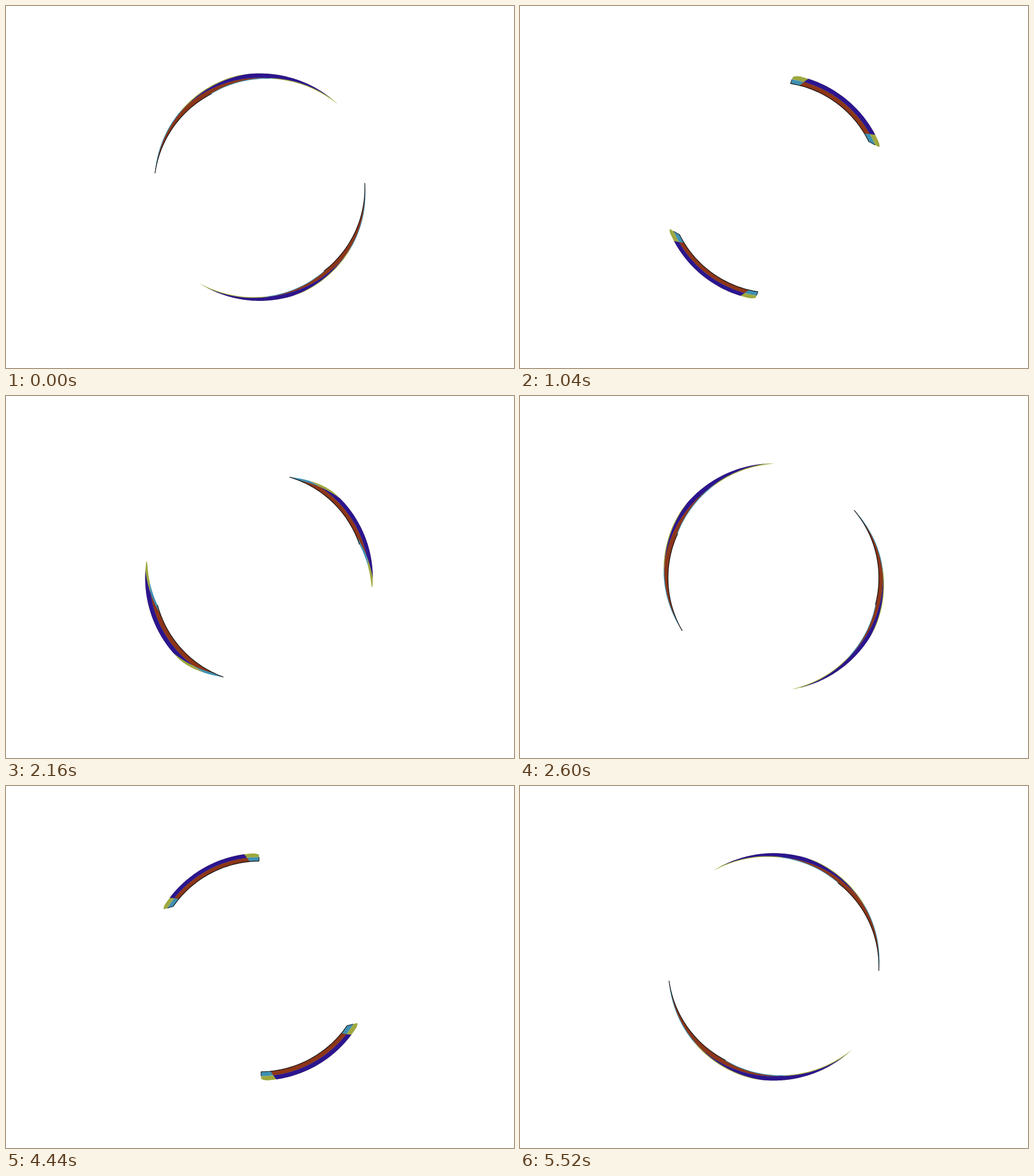
Write an HTML page with a canvas that moves like this. It is 886x632 px and loops after 5.56 s.

```html
<!DOCTYPE html>
<html lang="en">
<head>
<meta charset="utf-8">
<title>Twisting bands</title>
<style>
  html, body { margin: 0; width: 100%; height: 100%; overflow: hidden; background: #fff; }
  canvas { display: block; }
</style>
</head>
<body>
<canvas id="stage" width="886" height="632"></canvas>
<script>
const ctx = document.getElementById('stage').getContext('2d');
const STEP = 40, COUNT = 139, LAST = COUNT - 1, TURN = 33;
const CX = 442.5, CY = 317.5, RAD = Math.PI / 180;
const CORE = 22.4;           // half width of the band without its caps, degrees
const REST = 85;             // band angle at the turning point, degrees
const TWIST = 0.0965;        // inner edge lag per degree of turn

// steps from the turning point, degrees turned, degrees per step
const KEYS = [[0, 0, 0], [7, 35, 10], [22, 274, 29], [33, 731, 41], [37, 895, 41]];

function turned(x) {
  let i = 0;
  while (i < KEYS.length - 2 && x > KEYS[i + 1][0]) i++;
  const [x0, y0, v0] = KEYS[i], [x1, y1, v1] = KEYS[i + 1];
  const h = x1 - x0, s = (x - x0) / h, q = 1 - s;
  return y0 * q * q * (1 + 2 * s) + y1 * s * s * (3 - 2 * s) + h * s * q * (v0 * q - v1 * s);
}

// half width at depth d, with the outer corners rounded off
const capWidth = d => 30 - 2.5 * d - 3 * Math.max(0, 1 - d / 0.3) ** 3;
const coreWidth = () => CORE;

function drawBand(angle, lag, outer, inner) {
  const radius = d => outer + (inner - outer) * d;
  const mid = d => angle + lag * d;

  function point(d, deg) {
    ctx.lineTo(radius(d) * Math.cos(deg * RAD), -radius(d) * Math.sin(deg * RAD));
  }
  function side(d0, d1, width, sign) {
    for (let i = 0; i <= 24; i++) {
      const d = d0 + (d1 - d0) * i / 24;
      point(d, mid(d) + sign * width(d));
    }
  }
  function arc(d, width, sign) {
    for (let i = -20; i <= 20; i++) point(d, mid(d) + sign * width(d) * i / 20);
  }
  function fill(d0, d1, width, color) {
    ctx.beginPath();
    side(d0, d1, width, -1);
    arc(d1, width, 1);
    side(d1, d0, width, 1);
    arc(d0, width, -1);
    ctx.fillStyle = color;
    ctx.fill();
  }

  fill(0, 0.5, capWidth, '#9fa83e');
  fill(0.5, 1, capWidth, '#3f90b2');
  fill(0, 0.5, coreWidth, '#2c158f');
  fill(0.5, 1, coreWidth, '#8c3518');

  ctx.strokeStyle = '#101010';
  ctx.lineWidth = 1.2;
  ctx.beginPath();
  arc(1, capWidth, 1);
  ctx.stroke();

  // the ends show a dark rim only while the band is nearly straight
  ctx.globalAlpha = Math.max(0, 1 - Math.abs(lag) / 15);
  for (const sign of [-1, 1]) {
    ctx.beginPath();
    side(0.5, 1, capWidth, sign);
    ctx.stroke();
  }
  ctx.globalAlpha = 1;
}

function draw(step) {
  const flipped = step > LAST / 2;
  const turn = turned(Math.abs((flipped ? LAST - step : step) - TURN));
  const lag = turn * TWIST, angle = REST - turn;

  ctx.setTransform(1, 0, 0, 1, 0, 0);
  ctx.fillStyle = '#fff';
  ctx.fillRect(0, 0, 886, 632);
  if (flipped) ctx.setTransform(1, 0, 0, -1, CX, 632 - CY);
  else ctx.setTransform(1, 0, 0, 1, CX, CY);
  drawBand(angle + 180 + 0.15 * lag, lag, 197.2, 183.4);
  drawBand(angle, lag, 199.8, 184.4);
}

const start = performance.now();
function tick() {
  draw(Math.floor((performance.now() - start) / STEP) % COUNT);
  requestAnimationFrame(tick);
}
tick();
</script>
</body>
</html>
```
